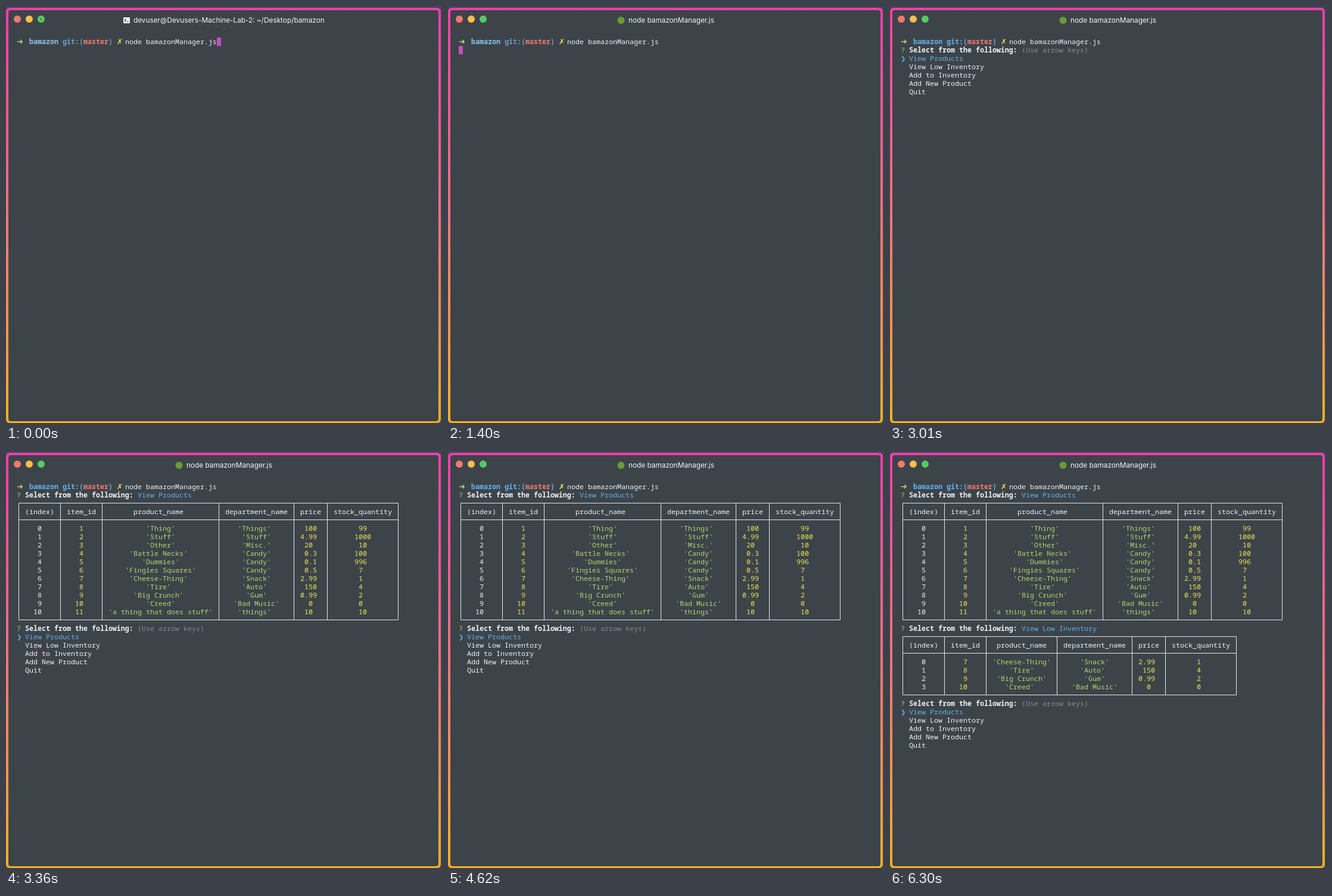
Recreate the animation shown at these times as an HTML page with a canvas. Size 732 px wide and 700 px high, loop 6370 ms.

```html
<!DOCTYPE html>
<html lang="en">
<head>
<meta charset="utf-8">
<title>Terminal session</title>
<style>
  html, body { margin: 0; width: 100%; height: 100%; overflow: hidden; background: #3c444a; }
  canvas { display: block; }
</style>
</head>
<body>
<canvas id="stage" width="732" height="700"></canvas>
<script>
const ctx = document.getElementById('stage').getContext('2d');
const LOOP = 6370, STEP = 70;
const LEFT = 18, TOP = 53, CELL = 7, LINE = 14;
const MONO = '11.67px "Noto Sans Mono", "DejaVu Sans Mono", monospace';
const C = {
  bg: '#3c444a', white: '#eff2f3', grey: '#858c91', blue: '#65b1ec', paleBlue: '#8fc1ea',
  dimBlue: '#6a9fc9', red: '#f9776d', yellow: '#f3e453', green: '#b1d76c', cursor: '#cb4cc0'
};

// Moments of the key presses and the output they cause.
const RUN = 750, MENU = 1440, TABLE = 3070, DOWN = 4840, LOW = 5180;

const CHOICES = ['View Products', 'View Low Inventory', 'Add to Inventory', 'Add New Product', 'Quit'];
const HEAD = ['(index)', 'item_id', 'product_name', 'department_name', 'price', 'stock_quantity'];
const PRODUCTS = `Thing|Things|100|99
Stuff|Stuff|4.99|1000
Other|Misc.|20|10
Battle Necks|Candy|0.3|100
Dummies|Candy|0.1|996
Fingies Squares|Candy|0.5|7
Cheese-Thing|Snack|2.99|1
Tire|Auto|150|4
Big Crunch|Gum|0.99|2
Creed|Bad Music|0|0
a thing that does stuff|things|10|10`.split('\n').map((line, i) => {
  const [name, department, price, stock] = line.split('|');
  return [`${i + 1}`, `'${name}'`, `'${department}'`, price, stock];
});
const LOW_STOCK = PRODUCTS.slice(6, 10);

const BURSTS = [
  { at: -480, x: 350, y: 60, count: 4 },
  { at: RUN, x: 19, y: 61, count: 9 },
  { at: MENU, x: 63, y: 144, count: 6 },
  { at: TABLE, x: 63, y: 368, count: 8 },
  { at: DOWN, x: 63, y: 368, count: 6 },
  { at: LOW, x: 63, y: 494, count: 8 }
];

const random = seed => {
  const v = Math.sin(seed * 127.1 + 11.7) * 43758.5453;
  return v - Math.floor(v);
};

function write(text, col, row, color = C.white, bold = false) {
  ctx.font = (bold ? 'bold ' : '') + MONO;
  ctx.fillStyle = color;
  ctx.fillText(text, LEFT + col * CELL, TOP + row * LINE + 11);
}

function symbol(text, col, row, color, size) {
  ctx.font = `bold ${size}px "DejaVu Sans", sans-serif`;
  ctx.fillStyle = color;
  ctx.fillText(text, LEFT + col * CELL, TOP + row * LINE + 11);
}

function disc(x, y, r, color) {
  ctx.fillStyle = color;
  ctx.beginPath();
  ctx.arc(x, y, r, 0, 7);
  ctx.fill();
}

function panel(x, y, w, h, r, fill) {
  ctx.fillStyle = fill;
  ctx.beginPath();
  ctx.roundRect(x, y, w, h, r);
  ctx.fill();
}

function drawWindow(t) {
  ctx.fillStyle = '#40465a';
  ctx.fillRect(0, 0, 732, 700);
  const edge = ctx.createLinearGradient(0, 3, 0, 700);
  edge.addColorStop(0, '#f53da7');
  edge.addColorStop(0.5, '#f6727a');
  edge.addColorStop(1, '#f8b022');
  panel(0, 3, 730, 697, 6, edge);
  panel(4, 7, 722, 690, 4, C.bg);
  ['#f6776d', '#fdbd4b', '#57c95e'].forEach((color, i) => disc(19 + 20 * i, 22, 6, color));

  const running = t >= RUN;
  if (running) {
    disc(290.5, 24, 6, '#6c9a35');
  } else {
    disc(59, 22, 1.5, '#2f7a38');
    panel(197, 19, 11, 10, 1, '#f4f5f6');
    ctx.strokeStyle = C.bg;
    ctx.lineWidth = 1.2;
    ctx.beginPath();
    ctx.moveTo(199, 21.5);
    ctx.lineTo(201.5, 24);
    ctx.lineTo(199, 26.5);
    ctx.moveTo(203, 26.5);
    ctx.lineTo(206, 26.5);
    ctx.stroke();
  }
  ctx.font = '11.8px Inter, sans-serif';
  ctx.fillStyle = '#f4f5f6';
  if (running) ctx.fillText('node bamazonManager.js', 303, 28);
  else ctx.fillText('devuser@Devusers-Machine-Lab-2: ~/Desktop/bamazon', 214, 28);
}

function drawCommand(t) {
  const early = t < MENU, git = early ? C.dimBlue : C.blue;
  symbol('➜', 0, 0, C.green, 13);
  write('bamazon', 3, 0, early ? C.paleBlue : C.blue, true);
  write('git:(', 11, 0, git, true);
  write('master', 16, 0, C.red, true);
  write(')', 22, 0, git, true);
  symbol('✗', 24, 0, C.yellow, 12);
  write('node bamazonManager.js', 26, 0);
  if (early) {
    const [col, row] = t < RUN ? [48, 0] : [0, 1];
    ctx.fillStyle = C.cursor;
    ctx.fillRect(LEFT + col * CELL, TOP + row * LINE, CELL, LINE);
  }
}

function drawQuestion(row, answer) {
  write('?', 0, row, C.green);
  write('Select from the following:', 2, row, C.white, true);
  write(answer || '(Use arrow keys)', 29, row, answer ? C.blue : C.grey);
}

function drawMenu(row, selected) {
  drawQuestion(row);
  CHOICES.forEach((choice, i) => {
    const active = i === selected;
    if (active) symbol('❯', 0, row + 1 + i, C.blue, 10);
    write(choice, 2, row + 1 + i, active ? C.blue : C.white);
  });
}

// Draws a boxed table and returns the first row below it.
function drawTable(row, products) {
  const rows = products.map((cells, i) => [`${i}`, ...cells]);
  const widths = HEAD.map((title, i) => 2 + Math.max(title.length, ...rows.map(r => r[i].length)));
  const colors = [C.white, C.yellow, C.green, C.green, C.yellow, C.yellow];
  const last = row + rows.length + 3;
  const lineX = col => LEFT + col * CELL + 3.5;
  const lineY = r => TOP + r * LINE + 6.5 + 0.0;
  const total = widths.reduce((sum, w) => sum + w + 1, 0);

  ctx.strokeStyle = '#e3e7e9';
  ctx.lineWidth = 1;
  ctx.beginPath();
  for (const r of [row, row + 2, last]) {
    ctx.moveTo(lineX(0), lineY(r));
    ctx.lineTo(lineX(total), lineY(r));
  }
  let col = 0;
  for (const w of [...widths, 0]) {
    ctx.moveTo(lineX(col), lineY(row));
    ctx.lineTo(lineX(col), lineY(last));
    col += w + 1;
  }
  ctx.stroke();

  col = 1;
  widths.forEach((w, i) => {
    const place = (text, r, color) => write(text, col + Math.floor((w - text.length) / 2), r, color);
    place(HEAD[i], row + 1, C.white);
    rows.forEach((cells, r) => place(cells[i], row + 3 + r, colors[i]));
    col += w + 1;
  });
  return last + 1;
}

function drawSession(t) {
  if (t < MENU) return;
  if (t < TABLE) return drawMenu(1, 0);
  drawQuestion(1, CHOICES[0]);
  const next = drawTable(2, PRODUCTS);
  if (t < LOW) return drawMenu(next, t < DOWN ? 0 : 1);
  drawQuestion(next, CHOICES[1]);
  drawMenu(drawTable(next + 1, LOW_STOCK), 0);
}

// Sparks leap up from the cursor, fall back and fade.
function drawSparks(t) {
  ctx.fillStyle = '#d0459f';
  BURSTS.forEach((burst, b) => {
    const n = (t - burst.at) * 0.06, alpha = 0.955 ** n;
    if (n < 0 || alpha < 0.07) return;
    ctx.globalAlpha = alpha;
    for (let i = 0; i < burst.count; i++) {
      const seed = b * 20 + i + 1;
      const vx = random(seed) * 2 - 1, vy = -1.5 - 2 * random(seed + 200);
      ctx.fillRect(burst.x + vx * n - 1.5, burst.y + vy * n + 0.0375 * n * n - 1.5, 3, 3);
    }
  });
  ctx.globalAlpha = 1;
}

function frame(now) {
  const t = Math.floor((now % LOOP) / STEP) * STEP;
  drawWindow(t);
  drawCommand(t);
  drawSession(t);
  drawSparks(t);
  requestAnimationFrame(frame);
}
requestAnimationFrame(frame);
</script>
</body>
</html>
```
